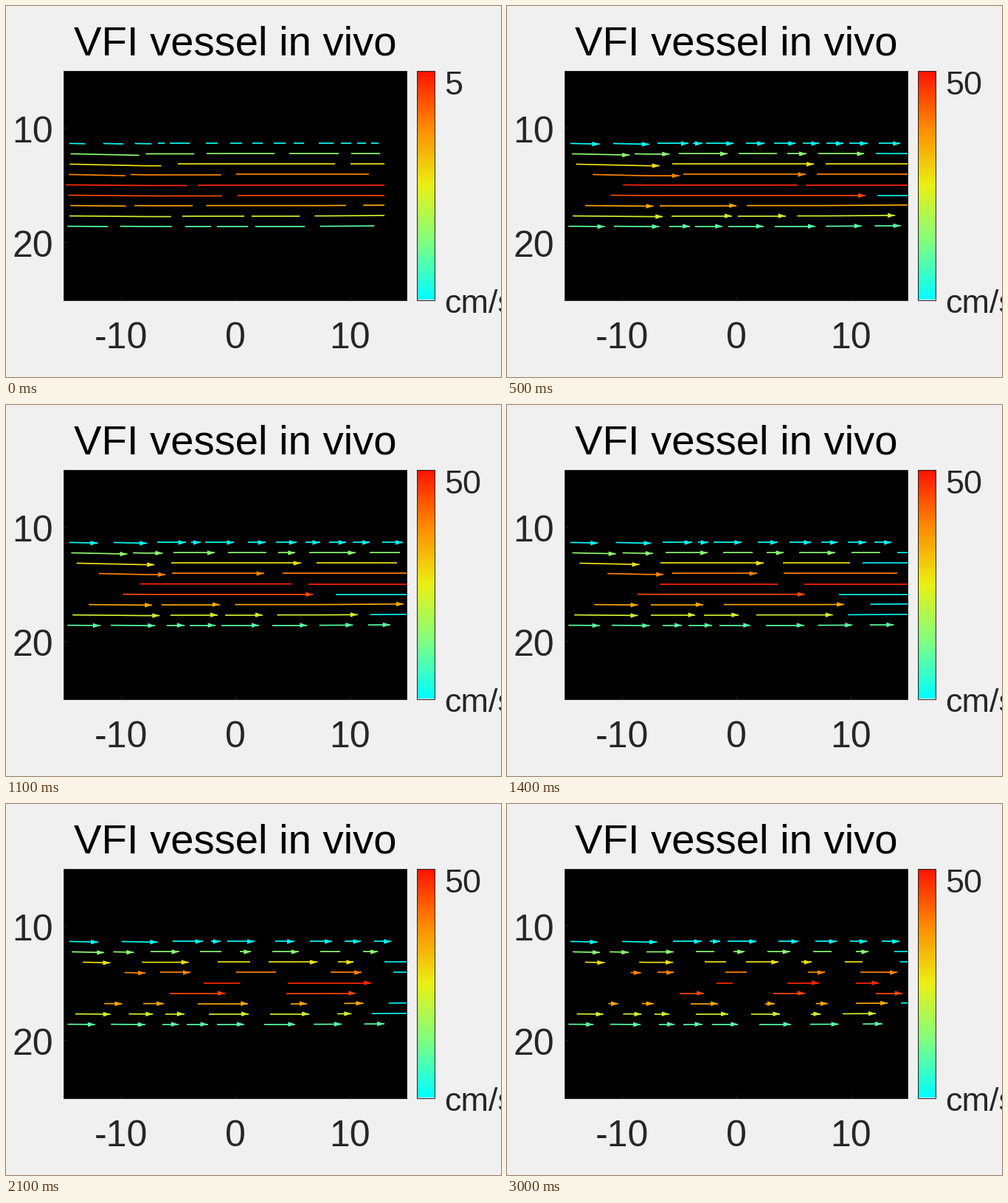
Recreate the animation shown at these times as a matplotlib script. Size 671 by 503 pixels, loop 3100 ms.

```python
import numpy as np
import matplotlib.pyplot as plt
from matplotlib.animation import FuncAnimation
from matplotlib.collections import LineCollection, PolyCollection
from matplotlib.colors import LinearSegmentedColormap
from matplotlib.patches import Rectangle

W, H, DPI = 671, 503, 128
PT = 72 / DPI
LEFT, RIGHT, TOP, BOTTOM = 78, 543, 88, 399
FRAMES, ROWS, SEED = 31, 9, 40
INK = "#262626"
TAIL_COLOR = "#00f0f0"

speed_map = LinearSegmentedColormap.from_list(
    "speed", ["#00ffff", "#80ff80", "#ebf014", "#ff8c00", "#ff1400"])


def row_y(row):
    return 186.4 + 14.03 * row


def speed(row):
    """Flow profile across the vessel: slow at the walls, fast in the middle."""
    return 1 - (abs(row - 4.3) / 4.35) ** 1.2


def pulse(step):
    """Heartbeat: a quick rise, then a long eased decay to rest."""
    decay = np.clip((step - 5) / 21, 0, 1)
    return min(1, 0.6 + 0.08 * step) * (0.5 + 0.5 * np.cos(np.pi * decay))


def layout(row, step):
    """Start, end, mean streak length and mean gap of one row."""
    v = speed(row)
    if step == 0:
        return LEFT + 2, 513, 16 + 210 * v, 16
    p = pulse(step)
    start = LEFT + 2 + (90 + 150 * (1 - p)) * v ** 4
    length = 30 + 360 * p * v ** 2
    gap = 12 + (1 - p) * (10 + 70 * v ** 3)
    return start, RIGHT, length, gap


def streaks(row, step):
    """Lay streaks from left to right; the same seed keeps them coherent."""
    rng = np.random.default_rng(SEED + row)
    x, end, mean, gap = layout(row, step)
    x += 8 * rng.random()
    while x < end - 8:
        size, space, shape, phase = rng.random(4)
        sway = 1 + 0.08 * np.sin(0.8 * step + 2 * np.pi * phase)
        x1 = x + mean * (0.4 + 1.2 * size) * sway
        pointed = step > 0 and x1 < end and shape < 0.87
        yield x, min(x1, end), pointed
        x = x1 + gap * (0.4 + 1.2 * space)


def path(row, x0, x1):
    """Streaks sag a little on the left and lift slightly at the far right."""
    x = np.linspace(x0, x1, 14)
    sag = 2.2 if row < 4 else 0.9
    y = row_y(row) + sag * (np.clip(x, 90, 190) - np.clip(x0, 90, 190)) / 100
    if row > 5:
        y = y - 0.8 * np.clip((x - 430) / 114, 0, 1)
    return np.column_stack([x, y])


def head(x, y):
    return [(x, y), (x - 10, y - 3.2), (x - 10, y + 3.2)]


fig = plt.figure(figsize=(W / DPI, H / DPI), dpi=DPI, facecolor="#f0f0f0")
ax = fig.add_axes([0, 0, 1, 1])
ax.axis("off")


def label(x, y, text, size, ha="left", color=INK):
    return ax.text(x, y, text, fontsize=size * PT, family="Liberation Sans",
                   ha=ha, va="baseline", color=color)


def box(x, width, fill):
    ax.add_patch(Rectangle((x, TOP), width, BOTTOM - TOP, facecolor=fill,
                           edgecolor=INK, lw=PT))


box(LEFT, RIGHT - LEFT, "black")
for value in (-10, 0, 10):
    x = 311 + value * 15.52
    ax.plot([x, x], [BOTTOM, BOTTOM - 4], color=INK, lw=PT)
    label(x, 463.5, str(value), 50, "center")
for value in (10, 20):
    y = 10 + value * 15.52
    ax.plot([LEFT, LEFT + 4], [y, y], color=INK, lw=PT)
    label(64.3, y + 19.5, str(value), 50, "right")
label(311, 66, "VFI vessel in vivo", 56.2, "center", "black")

ax.imshow(np.linspace(1, 0, 256)[:, None], cmap=speed_map, aspect="auto",
          extent=(557, 582, BOTTOM - 1, TOP))
box(557, 24, "none")
top_label = label(594, 120.4, "50", 45)
label(594, 416.5, "cm/s", 45)

lines = LineCollection([], linewidths=1.7 * PT, capstyle="butt", zorder=3)
heads = PolyCollection([], linewidths=0, zorder=4)
ax.add_collection(lines, autolim=False)
ax.add_collection(heads, autolim=False)
ax.set_xlim(0, W)
ax.set_ylim(H, 0)


def draw(step):
    segs, seg_colors, tips, tip_colors = [], [], [], []
    for row in range(ROWS):
        color = speed_map(speed(row))
        for x0, x1, pointed in streaks(row, step):
            pts = path(row, x0, x1)
            leaving = x1 >= RIGHT and x0 > 440
            segs.append(pts)
            seg_colors.append(TAIL_COLOR if leaving else color)
            if pointed:
                tips.append(head(*pts[-1]))
                tip_colors.append(color)
    lines.set_segments(segs)
    lines.set_color(seg_colors)
    heads.set_verts(tips)
    heads.set_facecolor(tip_colors)
    top_label.set_text("50" if step else "5")
    return lines, heads, top_label


anim = FuncAnimation(fig, draw, frames=FRAMES, interval=100, repeat=True,
                     repeat_delay=0, blit=False)
plt.show()
```
